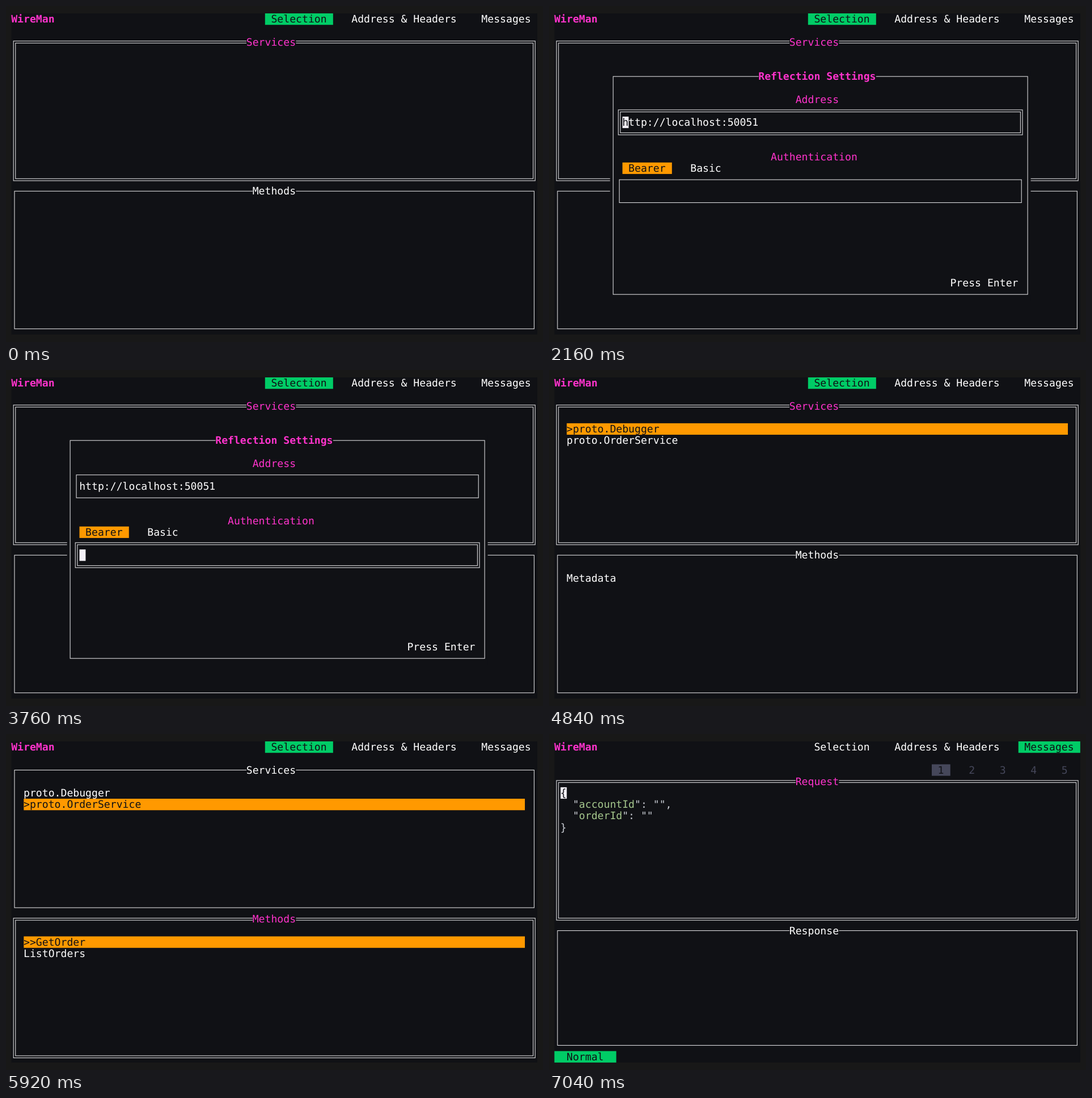
Recreate the animation shown at these times as an HTML page with a canvas. Size 947 px wide and 592 px high, loop 8.64 s.

```html
<!DOCTYPE html>
<html lang="en">
<head>
<meta charset="utf-8">
<title>Terminal gRPC client</title>
<style>
  html, body { margin: 0; width: 100%; height: 100%; overflow: hidden; background: #181818; }
  canvas { display: block; }
</style>
</head>
<body>
<canvas id="stage" width="947" height="592"></canvas>
<script>
const ctx = document.getElementById('stage').getContext('2d');
const LOOP = 8640;
const LEFT = 9.5, TOP = 13, CELL_W = 10.91, CELL_H = 20.21, COLS = 85, ROWS = 28;
const BG = '#101115', WHITE = '#ffffff', LINE = '#dcdcde', PINK = '#ff33cc', GREEN = '#00cc66',
      ORANGE = '#ff9900', GREY = '#45475a', CURSOR = '#f4f1f8', PUNCT = '#c8ccd3', STRING = '#a5c78d';

const colX = col => LEFT + col * CELL_W;
const rowY = row => TOP + row * CELL_H;

function fill(col, row, cols, rows, color) {
  ctx.fillStyle = color;
  ctx.fillRect(colX(col), rowY(row), cols * CELL_W, rows * CELL_H);
}

function text(col, row, string, color = WHITE, bold = false) {
  ctx.font = `${bold ? 'bold ' : ''}18.12px "DejaVu Sans Mono", monospace`;
  ctx.fillStyle = color;
  [...string].forEach((char, i) => ctx.fillText(char, colX(col + i) - 0.3, rowY(row) + 16.2));
}

function label(col, row, string, selected, color) {
  if (selected) fill(col, row, string.length + 2, 1, color);
  text(col + 1, row, string, selected ? BG : WHITE);
}

// Borders run through the middle of their cells.
function box(col1, row1, col2, row2, double) {
  ctx.strokeStyle = LINE;
  ctx.lineWidth = 1.1;
  for (const grow of double ? [-1.8, 1.8] : [0]) {
    const x = colX(col1 + 0.5) - grow, y = rowY(row1 + 0.5) - grow;
    ctx.strokeRect(x, y, colX(col2 + 0.5) + grow - x, rowY(row2 + 0.5) + grow - y);
  }
}

function title(row, string, color, bold) {
  const col = Math.floor((COLS - string.length) / 2);
  fill(col, row, string.length, 1, BG);
  text(col, row, string, color, bold);
}

function panel(row1, row2, name, focused) {
  box(0, row1, COLS - 1, row2, focused);
  title(row1, name, focused ? PINK : WHITE);
}

function list(row, items, selected, marker) {
  items.forEach((item, i) => {
    const active = i === selected;
    if (active) fill(2, row + i, 81, 1, ORANGE);
    text(2, row + i, (active ? marker : '') + item, active ? BG : WHITE);
  });
}

function cursor(col, row, char) {
  fill(col, row, 1, 1, CURSOR);
  text(col, row, char, BG);
}

function connectionForm(col1, col2, row, focus, auth) {
  title(row, 'Address', PINK);
  box(col1, row + 1, col2, row + 3, focus === 'address');
  text(col1 + 1, row + 2, 'http://localhost:50051');
  if (focus === 'address') cursor(col1 + 1, row + 2, 'h');

  title(row + 5, 'Authentication', PINK);
  label(col1 + 1, row + 6, 'Bearer', auth === 'Bearer', ORANGE);
  label(col1 + 11, row + 6, 'Basic', auth === 'Basic', ORANGE);
  box(col1, row + 7, col2, row + 9, focus === 'auth');
  if (focus === 'auth') cursor(col1 + 1, row + 8, ' ');
}

function header(active) {
  text(0, 0, 'WireMan', PINK, true);
  label(41, 0, 'Selection', active === 0, GREEN);
  label(54, 0, 'Address & Headers', active === 1, GREEN);
  label(75, 0, 'Messages', active === 2, GREEN);
}

function selectionPage({ services = [], service, methods = [], method, inMethods = false } = {}) {
  header(0);
  panel(2, 14, 'Services', !inMethods);
  panel(15, 27, 'Methods', inMethods);
  list(4, services, service, '>');
  list(17, methods, method, '>>');
}

function reflectionDialog(focus, auth = 'Bearer') {
  selectionPage();
  fill(9, 5, 68, 20, BG);
  box(9, 5, 76, 24);
  title(5, 'Reflection Settings', PINK, true);
  connectionForm(10, 75, 7, focus, auth);
  text(64, 23, 'Press Enter');
}

function statusLine() {
  fill(0, 27, 10, 1, GREEN);
  text(2, 27, 'Normal', BG);
}

function headersPage() {
  header(1);
  connectionForm(0, COLS - 1, 2, 'address', 'Bearer');
  title(13, 'Headers', PINK);
  statusLine();
}

function messagesPage() {
  header(2);
  fill(61, 2, 3, 1, GREY);
  for (let n = 1; n <= 5; n++) text(57 + 5 * n, 2, String(n), n === 1 ? BG : GREY);
  panel(3, 15, 'Request', true);
  panel(16, 26, 'Response', false);

  cursor(1, 4, '{');
  ['accountId', 'orderId'].forEach((key, i) => {
    text(3, 5 + i, '"', PUNCT);
    text(4, 5 + i, key, STRING);
    text(4 + key.length, 5 + i, '": ""' + (i ? '' : ','), PUNCT);
  });
  text(1, 7, '}', PUNCT);
  statusLine();
}

const services = ['proto.Debugger', 'proto.OrderService'];
const methods = ['GetOrder', 'ListOrders'];
const scenes = [
  [0, () => selectionPage()],
  [1080, () => reflectionDialog()],
  [2160, () => reflectionDialog('address')],
  [2720, () => reflectionDialog('auth')],
  [3240, () => reflectionDialog('auth', 'Basic')],
  [3760, () => reflectionDialog('auth')],
  [4840, () => selectionPage({ services, service: 0, methods: ['Metadata'] })],
  [5360, () => selectionPage({ services, service: 1, methods })],
  [5920, () => selectionPage({ services, service: 1, methods, method: 0, inMethods: true })],
  [6480, headersPage],
  [7040, messagesPage],
];

ctx.textRendering = 'geometricPrecision';

function render(now) {
  const time = now % LOOP;
  ctx.fillStyle = '#181818';
  ctx.fillRect(0, 0, 947, 592);
  fill(0, 0, COLS, ROWS, BG);
  scenes.findLast(([start]) => start <= time)[1]();
}

const origin = performance.now();
function tick() {
  render(performance.now() - origin);
  requestAnimationFrame(tick);
}
tick();
</script>
</body>
</html>
```
